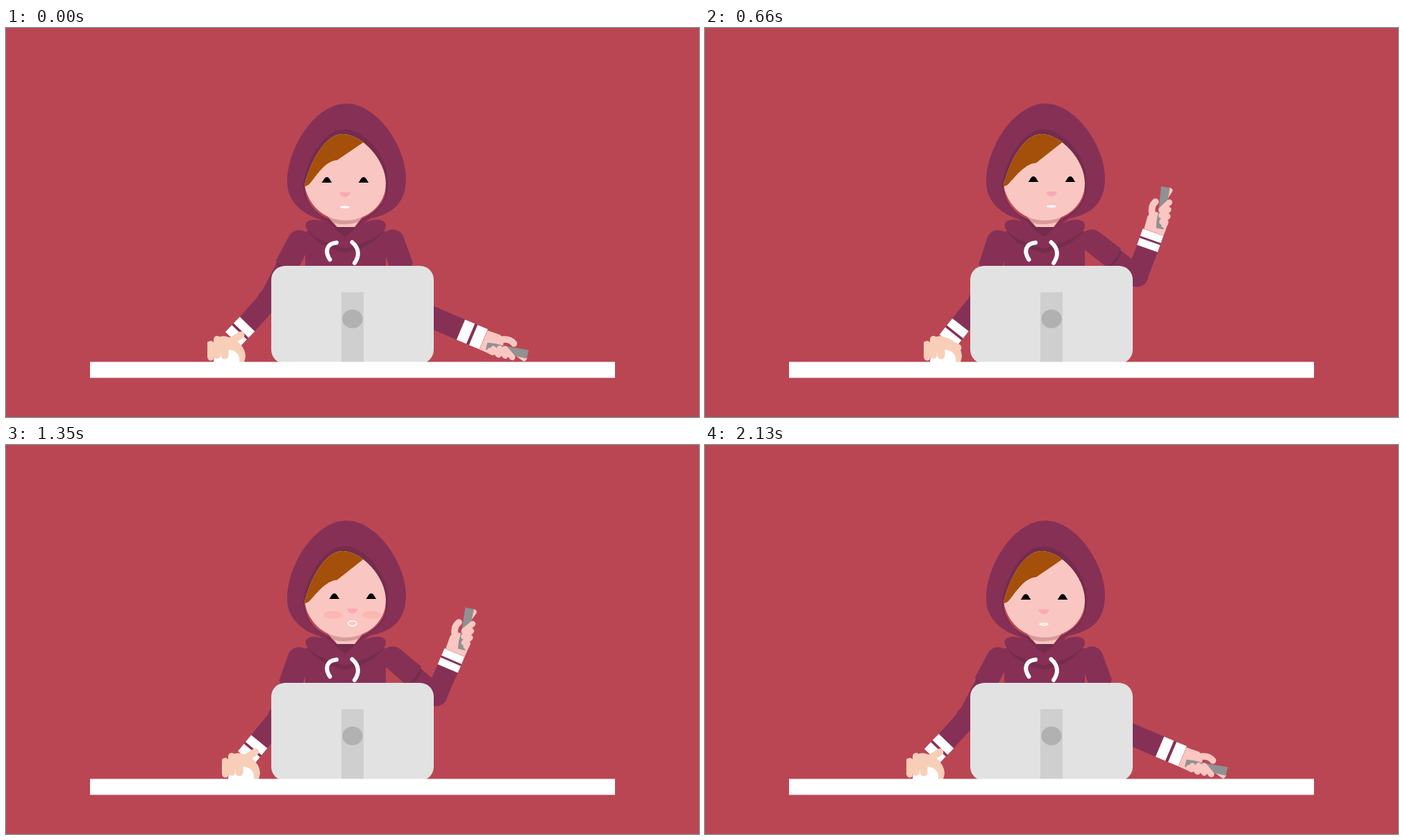
An HTML page with a canvas for the animation above (2160 ms loop, 998x561 px).

```html
<!DOCTYPE html>
<html>
<head>
<meta charset="utf-8">
<style>
html, body { margin: 0; width: 100%; height: 100%; overflow: hidden; background: #ba4654; }
canvas { display: block; }
</style>
</head>
<body>
<canvas id="stage" width="998" height="561"></canvas>
<script>
const ctx = document.getElementById('stage').getContext('2d');
const LOOP = 2160, RAD = Math.PI / 180;
const RED = '#ba4654', PLUM = '#863056', DARK = '#742c4d', SKIN = '#fac6c1',
      PEACH = '#f8ceb8', WHITE = '#fff', GREY = '#919191';

const mix = (a, b, p) => a + (b - a) * p;
const smooth = p => p * p * (3 - 2 * p);

// Eased value at time t from a list of [time, value]
function track(keys, t) {
  for (let i = 1; i < keys.length; i++) {
    const [t0, a] = keys[i - 1], [t1, b] = keys[i];
    if (t <= t1) return mix(a, b, smooth(Math.max(0, (t - t0) / (t1 - t0))));
  }
  return keys[keys.length - 1][1];
}

// Curve through a at 0, b at m and c at 1
function bend(p, a, b, c, m = 0.685) {
  return a * (p - m) * (p - 1) / m + b * p * (p - 1) / (m * (m - 1)) + c * p * (p - m) / (1 - m);
}

function fill(d, color) {
  ctx.fillStyle = color;
  ctx.fill(new Path2D(d));
}

function line(d, color, width, cap = 'round') {
  ctx.strokeStyle = color;
  ctx.lineWidth = width;
  ctx.lineCap = cap;
  ctx.stroke(new Path2D(d));
}

function oval(x, y, rx, ry, color) {
  ctx.fillStyle = color;
  ctx.beginPath();
  ctx.ellipse(x, y, rx, ry, 0, 0, 7);
  ctx.fill();
}

function box(x, y, w, h, color, r = 0) {
  ctx.fillStyle = color;
  ctx.beginPath();
  ctx.roundRect(x, y, w, h, r);
  ctx.fill();
}

function at(x, y, angle, draw) {
  ctx.save();
  ctx.translate(x, y);
  ctx.rotate(angle);
  draw();
  ctx.restore();
}

function arm(shoulder, elbow, wrist, cuff, width) {
  const [sx, sy] = shoulder, [ex, ey] = elbow, [wx, wy] = wrist;
  line(`M${sx} ${sy}L${ex} ${ey}`, PLUM, 29);
  oval(ex, ey, 16.5, 16.5, PLUM);
  line(`M${ex} ${ey}L${wx} ${wy}`, PLUM, width, 'butt');
  at(wx, wy, cuff.angle, () => {
    const n = cuff.size;
    box(-2, -width / 2, n, width, PLUM);
    box(0, -width / 2, n * 0.43, width, WHITE);
    box(n * 0.55, -width / 2, n * 0.45, width, WHITE);
  });
  at(sx, sy, Math.atan2(ey - sy, ex - sx), () => {
    fill('M0 -14H43Q50 0 43 14H0Z', DARK);
    fill('M0 -16.5A16.5 16.5 0 0 0 0 16.5L40 17Q45 0 40 -17Z', PLUM);
  });
}

function leftArm(t) {
  const p = track([[0, 0], [450, 1], [680, 1], [1060, 0], [1090, 0], [1440, 1], [1670, 1], [2100, 0]], t);
  const finger = track([[0, -32], [420, -55], [660, 25], [1000, -32], [1350, -33], [1740, -66], [2100, -32]], t);
  arm([422, 308], [mix(378, 396, p), 393], [mix(347.5, 368, p), mix(427, 428, p)],
      { angle: mix(134, 128.5, p) * RAD, size: 30 }, 30);
  at(25 * p, 0, 0, () => {
    fill('M299 482C299 469 307 462 318 462C330 462 338 470 338 482Z', WHITE);
    fill('M304 447Q312 442 321 446C334 449 345 461 345 474L343 482H336C338 471 330 464 320 464L304 470Z', PEACH);
    line('M295 456V475', PEACH, 9.5);
    line('M304 449V472', PEACH, 10);
    line('M315 451V472', PEACH, 11);
    box(290, 452, 5, 24, PEACH, 2);
    at(322, 453, finger * RAD, () => line('M0 0H19', PEACH, 10.5));
  });
}

function rightArm(t) {
  const p = track([[0, 0], [660, 1], [1290, 1], [1810, 0]], t);
  const angle = mix(23, -70.5, p) * RAD, size = bend(p, 35.5, 25, 25);
  const wrist = [bend(p, 655, 634, 637), bend(p, 435, 354, 318)];
  arm([557, 307], [bend(p, 592, 604, 622), bend(p, 408, 381, 357)], wrist, { angle, size }, 31.5);
  const hx = wrist[0] + size * Math.cos(angle), hy = wrist[1] + size * Math.sin(angle);
  at(hx, hy, angle + 70.5 * RAD, () => {
    ctx.translate(-645, -294);
    line('M660 248L669 234', SKIN, 8);
    fill('M632 289L637 271Q642 264 650 265L662 268L667 280L660 299Z', SKIN);
    line('M645 273Q640 257 648.500 250', SKIN, 9.5);
    fill('M656.500 228L669 230L660 290L649.500 288L650 277L653 262Z', GREY);
    line('M657 262L668.500 251', SKIN, 8.5);
    line('M657 270L667 261.500M658 279L666 271', SKIN, 8.5);
    line('M661 284L663 280', SKIN, 8);
  });
}

function torso() {
  fill('M431 293H547V346H431Z', PLUM);
  fill('M432 287C438 302 456 318 488 324C520 318 541 302 547 287Z', DARK);
  fill('M470 287C457 274 432 273 431.500 284C432 297 456 309 488 318C522 309 546 297 547 284C546 273 522 274 508 287Z', PLUM);
}

const face = 'M485 153C512 153 547 190 547 224C547 255 520 277.500 489 277.500C455 277.500 434 252 430 226C438 195 458 153 485 153Z';

function head(t) {
  const p = track([[0, 0], [580, 1], [1320, 1], [1800, 0]], t);
  const blush = track([[700, 0], [1000, 1], [1800, 1], [2080, 0]], t);
  const mouth = track([[0, 0.9], [690, 0.9], [1080, 3.7], [1320, 3.6], [1820, 1.5], [2130, 1.3]], t);
  const lid = track([[1000, 1], [1110, 0.38], [1220, 1]], t);

  fill('M490 109C446 109 405 172 405 222C405 250 426 268 452 276L489 302L524 275C560 268 576 250 576 216C576 172 535 109 490 109Z', PLUM);
  fill('M488 146C520 147 551 190 550 222C551 250 538 265 514 277L488 304L462 277C438 262 428 245 428 226C432 195 455 146 488 146Z', DARK);
  fill('M464 283L488 301L512 283L508 290L488 305L470 290Z', PLUM);
  fill('M485 153C512 153 548 195 547 234C546 252 532 266 512 276L503 287H476L466 276C445 268 430 250 430 226C440 195 458 153 485 153Z', RED);
  fill('M464 272H513L502 287H477Z', SKIN);
  fill('M464 272H513L507 280Q489 286 471 281Z', '#d79c99');
  fill(face, SKIN);

  ctx.save();
  ctx.clip(new Path2D(face));
  const y = 190.5 + 4 * p;
  fill(`M420 140H530V155L513 166L477 ${y}C${458 + 2 * p} ${y + 1} 445 217 436 226L428 230Z`, '#a4500a');
  ctx.translate(11 * p, -p);
  ctx.globalAlpha = blush;
  oval(460, 246, 13.5, 5.8, '#fab7b4');
  oval(516, 246, 13.5, 5.8, '#fab7b4');
  ctx.globalAlpha = 1;
  for (const x of [462, 515]) {
    at(x, 223, 0, () => {
      ctx.scale(1, lid);
      fill('M-7.500 0C-5 -2 -4 -8 0 -8C4 -8 5 -2 7.500 0Z', '#000');
    });
  }
  fill('M480 237H496Q494 244 488 244Q482 244 480 237Z', '#fca9b2');
  ctx.strokeStyle = WHITE;
  ctx.lineWidth = 1.6;
  ctx.beginPath();
  ctx.ellipse(488, 258.3, 6, mouth, 0, 0, 7);
  ctx.stroke();
  ctx.restore();

  line('M476 309.500C461 311 459 323 466.500 334', WHITE, 6);
  line('M498.500 309C509 318 509 329 502 339', WHITE, 6);
}

function desk() {
  box(382, 343, 234, 141, '#e2e2e2', 20);
  box(483, 381, 32, 102, '#cfcfcf');
  oval(499, 419.5, 14.7, 13.5, '#b1b1b1');
  box(121, 481.5, 756, 23, WHITE);
}

function draw() {
  const t = performance.now() % LOOP;
  box(0, 0, 998, 561, RED);
  leftArm(t);
  rightArm(t);
  torso();
  head(t);
  desk();
  requestAnimationFrame(draw);
}
draw();
</script>
</body>
</html>
```
